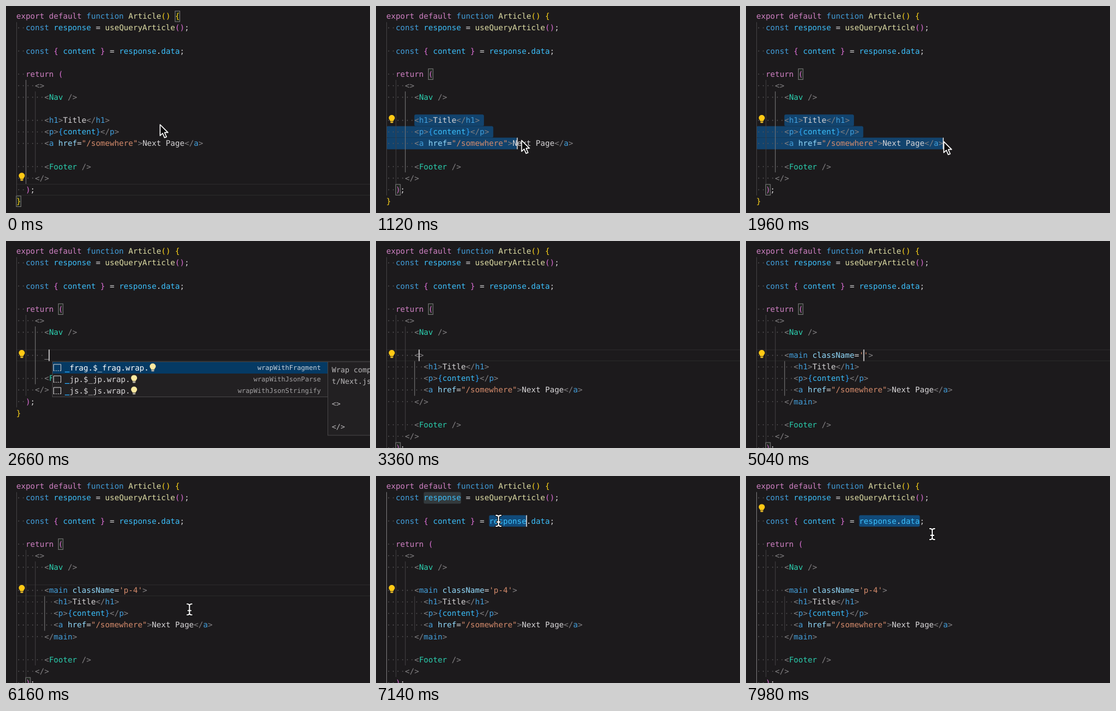
Recreate the animation shown at these times as an HTML page. Size 600x342 px, loop 8 s.

```html
<!DOCTYPE html>
<html lang="en">
<head>
<meta charset="utf-8">
<title>Wrapping JSX in the editor</title>
<style>
  html, body { margin: 0; width: 100%; height: 100%; overflow: hidden; background: #1c1a1c; }
  svg { display: block; width: 600px; height: 342px; }
  text {
    font-family: "DejaVu Sans Mono", Menlo, monospace;
    font-size: 12.79px;
    white-space: pre;
    text-rendering: geometricPrecision;
  }
</style>
</head>
<body>
<svg id="stage" viewBox="0 0 600 342"></svg>
<script>
const LOOP = 8000, STEP = 140;
const LEFT = 17, TOP = 17, CW = 7.7, LH = 19.1;
const COLORS = {
  k: '#d081c4', b: '#429fdc', f: '#e0dfa6', v: '#3cc0fc', a: '#93dcfe', t: '#2bcfaf',
  g: '#ffd61a', o: '#dd6fd6', s: '#d68c6c', p: '#838183', w: '#d8d6d8', i: '#2aa3fb'
};

// Each line is "indent|c:text|c:text", with c a colour key.
const HEAD = [
  '0|k:export default |b:function |f:Article|g:() {',
  '2|b:const |v:response |w:= |f:useQueryArticle|o:()|w:;',
  '',
  '2|b:const |o:{ |v:content |o:} |w:= |v:response|w:.|v:data|w:;',
  '',
  '2|k:return |o:(',
  '4|p:<>',
  '6|p:<|t:Nav |p:/>',
  ''
];
const TAIL = ['', '6|p:<|t:Footer |p:/>', '4|p:</>', '2|o:)|w:;', '0|g:}'];
const content = n => [
  n + '|p:<|b:h1|p:>|w:Title|p:</|b:h1|p:>',
  n + '|p:<|b:p|p:>|i:{|v:content|i:}|p:</|b:p|p:>',
  n + '|p:<|b:a |a:href|w:=|s:"/somewhere"|p:>|w:Next Page|p:</|b:a|p:>'
];
const ROW_ENDS = { 9: 20, 10: 22, 11: 40 };

const TYPE_AT = 2380, WRAP_AT = 3080, CLICK_AT = 560, PICK_AT = 6860;
const TYPING = [
  [WRAP_AT, ''], [3640, 'm'], [3780, 'ma'], [3920, 'mai'], [4060, 'main'],
  [4340, 'main '], [4480, 'main c'], [4620, 'main cl'], [4760, 'main className'],
  [4900, "main className='"], [5180, "main className='p"],
  [5320, "main className='p-"], [5460, "main className='p-4"]
];
const ARROW = [[0, 254, 196], [140, 254, 196], [560, 64, 186], [1120, 240, 222], [1680, 326, 224], [2380, 326, 224]];
const BEAM = [[5880, 357, 300], [6580, 202, 74], [7140, 202, 74], [7560, 285, 76], [7840, 307, 96], [8000, 307, 96]];

const colX = c => LEFT + c * CW;
const rowY = r => TOP + r * LH;
const last = (table, t) => table.filter(e => e[0] <= t).pop();
const esc = s => s.replace(/&/g, '&amp;').replace(/</g, '&lt;');

function along(keys, t) {
  const n = Math.max(1, keys.findIndex(k => k[0] >= t));
  const [t0, x0, y0] = keys[n - 1], [t1, x1, y1] = keys[n];
  const u = Math.min(1, Math.max(0, (t - t0) / (t1 - t0))), e = u * u * (3 - 2 * u);
  return [x0 + (x1 - x0) * e, y0 + (y1 - y0) * e];
}

const rect = (x, y, w, h, fill, extra = '') =>
  `<rect x="${x}" y="${y}" width="${w}" height="${h}" fill="${fill}" ${extra}/>`;
const label = (x, y, s, fill, extra = '') =>
  `<text x="${x}" y="${y}" fill="${fill}" ${extra}>${esc(s)}</text>`;
const mark = (row, from, to, fill = '#12436d') =>
  rect(colX(from), rowY(row) - LH / 2, (to - from) * CW, LH, fill, 'rx="2.5"');
const bracket = (row, col) =>
  rect(colX(col), rowY(row) - 8.7, CW, 17.6, '#1c231c', 'stroke="#858385" stroke-width=".9"');
const caretAt = (row, col) => rect(colX(col) - .6, rowY(row) - LH / 2, 1.6, LH, '#cfcdcf');

function codeLine(line, row) {
  if (!line) return '';
  const [indent, ...tokens] = line.split('|');
  let col = +indent, out = '';
  for (let c = 0; c < col; c++)
    out += `<circle cx="${colX(c + .5)}" cy="${rowY(row)}" r=".85" fill="#575557"/>`;
  for (const token of tokens) {
    const s = token.slice(2);
    out += label(colX(col), rowY(row) + 4.2, s, COLORS[token[0]]);
    col += s.length;
  }
  return out;
}

function currentLine(row) {
  const y = rowY(row) - LH / 2;
  return rect(LEFT, y, 583, 1, '#2c2a2c') + rect(LEFT, y + LH - 1, 583, 1, '#2c2a2c');
}

function guides(count, wrapped, active) {
  const spans = [[0, 1, count - 2], [2, 6, count - 3], [4, 7, count - 4]];
  if (wrapped) spans.push([6, 10, 12]);
  return spans.map(([c, a, b]) =>
    rect(colX(c), rowY(a) - LH / 2, 1, (b - a + 1) * LH, c === active ? '#777577' : '#413f41')).join('');
}

function bulb(x, y, glass, base) {
  return `<path d="M${x - 2.6} ${y + 3.5}C${x - 2.8} ${y + 1.5} ${x - 5} ${y + 1} ${x - 5} ${y - 1.6}
    a5 5 0 0 1 10 0C${x + 5} ${y + 1} ${x + 2.8} ${y + 1.5} ${x + 2.6} ${y + 3.5}Z" fill="${glass}"/>` +
    rect(x - 2.4, y + 4.1, 4.8, 2.4, base, 'rx="1"');
}

function popup(withDocs) {
  const edge = 'stroke="#464446" stroke-width="1"';
  const items = [['frag', 'wrapWithFragment'], ['jp', 'wrapWithJsonParse'], ['js', 'wrapWithJsonStringify']];
  let out = rect(76.5, 199.5, 454, 58, '#222022', edge);
  items.forEach(([key, detail], n) => {
    const y = 209.3 + n * LH, name = `.$_${key}.wrap.`;
    if (!n) out += rect(77, 200, 453, 19, '#053a64');
    out += `<path d="M78.5 ${y + 5}V${y - 5.5}H90.5V${y + 5}" fill="none" stroke="#cccacc"/>` +
      `<path d="M78 ${y + 5}H91" stroke="#cccacc" stroke-dasharray="2 1.6"/>` +
      label(97, y + 4.2, '_', '#2aaaff', 'font-weight="bold"') +
      label(97 + CW, y + 4.2, key + name, n ? '#d8d6d8' : '#fff') +
      bulb(97 + CW * (1 + key.length + name.length) + 6.3, y - .4, '#fbe9a0', '#b9b3a6') +
      label(519, y + 3.6, detail, n ? '#a3a1a3' : '#c6d0da', 'text-anchor="end" style="font-size:10.85px"');
  });
  if (withDocs) {
    out += rect(530.5, 199.5, 80, 121.5, '#222022', edge);
    [['Wrap comp', 217], ['t/Next.js', 236], ['<>', 273], ['</>', 311]].forEach(([s, y]) =>
      out += label(537, y, s, '#b9b7b9', 'style="font-size:12px"'));
  }
  return out;
}

const arrow = ([x, y]) =>
  `<path transform="translate(${x} ${y})" d="M0 0V18.2L4.2 14.3L7.4 21.6L10.6 20.2L7.4 13.1H13Z"
    fill="#0b0a0b" stroke="#fff" stroke-width="1.5" stroke-linejoin="round"/>`;

function beam([x, y]) {
  const d = 'M-4 -9Q0 -9 0 -6Q0 -9 4 -9M0 -6V6M-4 9Q0 9 0 6Q0 9 4 9M-2.5 2H2.5';
  const stroke = (color, w) => `<path d="${d}" fill="none" stroke="${color}" stroke-width="${w}" stroke-linecap="round"/>`;
  return `<g transform="translate(${x} ${y})">${stroke('#0b0a0b', 4)}${stroke('#fff', 1.8)}</g>`;
}

function openTag(typed) {
  const [name, rest] = typed.split(' ');
  let line = '6|p:<|b:' + name;
  if (rest !== undefined) {
    const [attr, value] = rest.split('=');
    line += '|a: ' + attr;
    if (value !== undefined) line += `|w:=|s:${value}'`;
  }
  return line + '|p:>';
}

function scene(t) {
  const wrapped = t >= WRAP_AT, snippet = t >= TYPE_AT && !wrapped;
  const typed = wrapped ? last(TYPING, t)[1] : '';
  const body = wrapped
    ? [openTag(typed), ...content(8), `6|p:</|b:${typed.split(' ')[0]}|p:>`]
    : snippet ? ['6|w:_'] : content(6);
  const lines = [...HEAD, ...body, ...TAIL], closeRow = lines.length - 2;
  let back = '', caret = '', over = '', active = 4, bulbRow = 9;

  if (t < CLICK_AT) {
    active = 2;
    bulbRow = 14;
    back = currentLine(15) + bracket(0, 34) + bracket(16, 0);
    if (t >= 280) caret = caretAt(15, 4);
  } else if (t < TYPE_AT) {
    const [x, y] = along(ARROW, t);
    const row = Math.min(11, Math.max(9, Math.round((y - TOP) / LH)));
    const col = Math.min(ROW_ENDS[row], Math.max(0, Math.floor((x - LEFT) / CW)));
    if (t < 840) bulbRow = 14;
    if (row === 9 && col <= 6) back = currentLine(9);
    for (let r = 9; r <= row; r++)
      back += mark(r, r === 9 ? 6 : 0, r === row ? Math.max(col, r === 9 ? 6 : 0) : ROW_ENDS[r] + .9);
    back += bracket(5, 9) + bracket(15, 2);
    caret = caretAt(row, col);
  } else if (snippet) {
    back = currentLine(9) + bracket(5, 9);
    caret = caretAt(9, 7);
    if (t >= 2520) over = popup(t >= 2660);
  } else if (t < PICK_AT) {
    active = 6;
    back = currentLine(9) + bracket(5, 9) + bracket(closeRow, 2);
    if (t < 5460 || Math.floor((t - 5460) / 530) % 2 === 0) caret = caretAt(9, 7 + typed.length);
  } else {
    active = 0;
    const dragCol = (along(BEAM, t)[0] - LEFT) / CW;
    const end = dragCol >= 31 ? 35 : 30;
    if (t >= 7000) {
      back = mark(3, 22, end, '#114a79');
      if (end === 30) back += mark(1, 8, 16, '#333a3d');
      if (t < 7700) caret = caretAt(3, end);
    } else {
      back = currentLine(3);
      caret = caretAt(3, 24);
    }
    if (t >= 7700) bulbRow = 2;
  }

  if (t < TYPE_AT) over += arrow(along(ARROW, t));
  if (t >= BEAM[0][0]) over += beam(along(BEAM, t));

  return rect(0, 0, 600, 342, '#1c1a1c') + back + guides(lines.length, wrapped, active) +
    lines.map(codeLine).join('') + bulb(26, rowY(bulbRow) - 2.2, '#ffc914', '#e0b42a') + caret + over;
}

const stage = document.getElementById('stage');
let shown = -1;
function tick() {
  const t = Math.floor(performance.now() % LOOP / STEP) * STEP;
  if (t !== shown) stage.innerHTML = scene(shown = t);
  requestAnimationFrame(tick);
}
tick();
</script>
</body>
</html>
```
